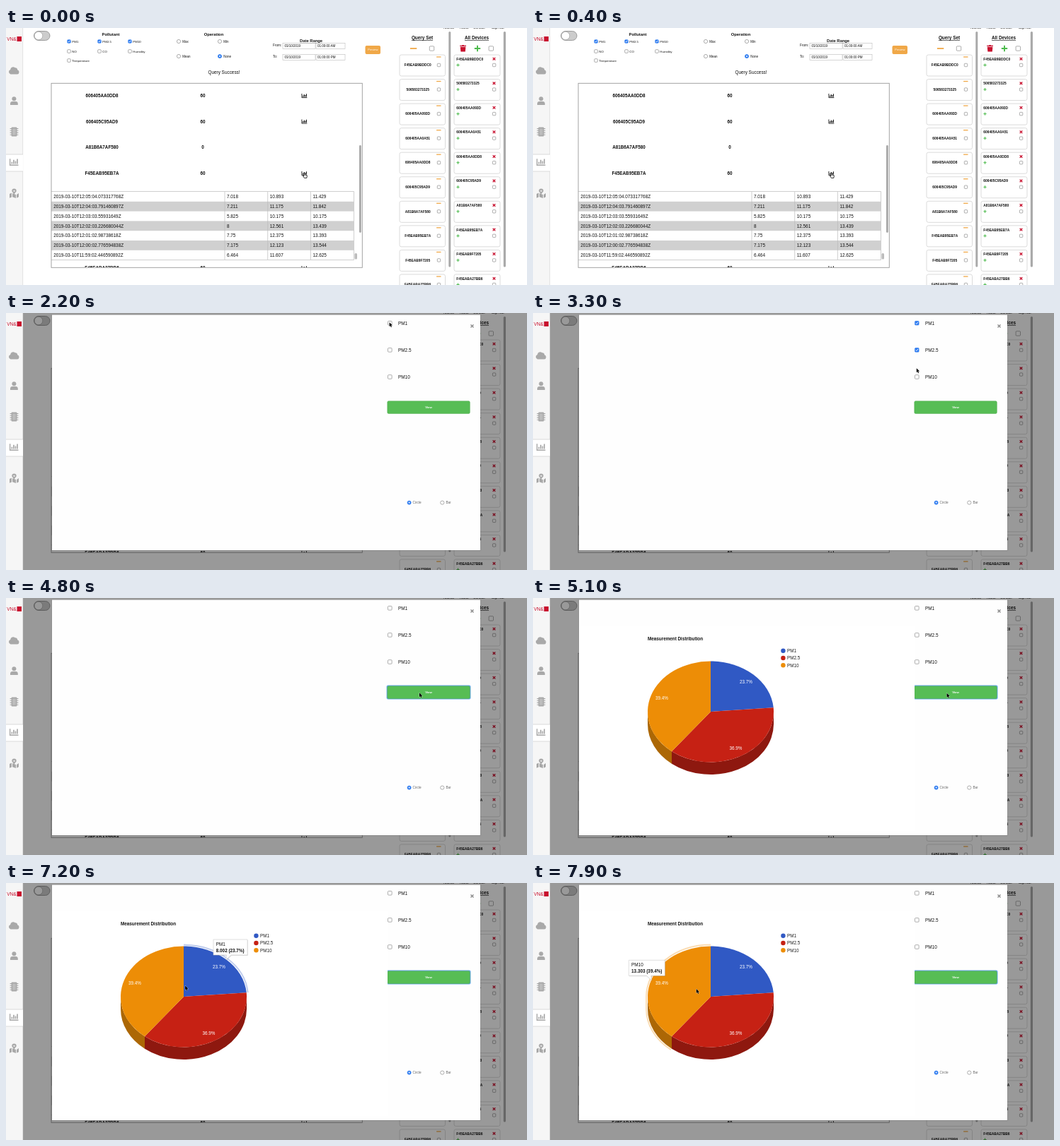
Animation, 736 px wide and 364 px high, one loop 8000 ms. Source, as an HTML page:

```html
<!DOCTYPE html>
<html lang="en">
<head>
<meta charset="utf-8">
<title>Sensor query</title>
<style>
  html, body { margin: 0; width: 100%; height: 100%; overflow: hidden; background: #fff; }
  svg { display: block; width: 736px; height: 364px; }
  text { font-family: "Liberation Sans", Arial, sans-serif; white-space: pre; }
</style>
</head>
<body>
<svg id="stage" viewBox="0 0 736 364" xmlns="http://www.w3.org/2000/svg"></svg>
<script>
const stage = document.getElementById('stage');
const BLUE = '#2f7cf0', ORANGE = '#f0a848', GREEN = '#4cba4c', RED = '#c8102e';

// y is the vertical middle of the text
function text(x, y, s, size, o = {}) {
  return `<text x="${x}" y="${y + size * 0.36}" font-size="${size}" fill="${o.fill || '#111'}"` +
    ` font-weight="${o.bold ? 700 : 400}" text-anchor="${o.mid ? 'middle' : 'start'}"` +
    `${o.line ? ' text-decoration="underline"' : ''}>${s}</text>`;
}
function rect(x, y, w, h, fill, more = '') {
  return `<rect x="${x}" y="${y}" width="${w}" height="${h}" fill="${fill}" ${more}/>`;
}
function path(d, fill, more = '') {
  return `<path d="${d}" fill="${fill}" ${more}/>`;
}
function line(d, color, width) {
  return path(d, 'none', `stroke="${color}" stroke-width="${width}"`);
}
function at(x, y, body) {
  return `<g transform="translate(${x} ${y})">${body}</g>`;
}
function check(x, y, on, s = 5) {
  const r = s / 2, k = s / 6;
  const box = rect(-r, -r, s, s, on ? BLUE : '#fff', `rx="1" stroke="${on ? BLUE : '#777'}" stroke-width=".6"`);
  const tick = on ? line(`M${-1.7 * k} 0L${-0.5 * k} ${1.4 * k}L${1.8 * k} ${-1.6 * k}`, '#fff', 0.9) : '';
  return at(x, y, box + tick);
}
function radio(x, y, on) {
  return `<circle cx="${x}" cy="${y}" r="2.6" fill="${on ? BLUE : '#fff'}" stroke="${on ? BLUE : '#777'}" stroke-width=".6"/>` +
    (on ? `<circle cx="${x}" cy="${y}" r="1" fill="#fff"/>` : '');
}
const minus = (x, y, r, w) => line(`M${x - r} ${y}H${x + r}`, ORANGE, w);
const plus = (x, y, r, w) => line(`M${x - r} ${y}H${x + r}M${x} ${y - r}V${y + r}`, GREEN, w);
const cross = (x, y, r, c, w) => line(`M${x - r} ${y - r}L${x + r} ${y + r}M${x + r} ${y - r}L${x - r} ${y + r}`, c, w);
function bars(x, y, k, c) {
  return `<g transform="translate(${x} ${y}) scale(${k})">` +
    line('M-3.6-3V2.6H3.8', c, 0.9) + line('M-1.9 1.6V-.2M-.3 1.6V-2M1.3 1.6V-1M2.9 1.6V-2.8', c, 1.05) + '</g>';
}

const ids = ['F45EAB9BDDC0', '506583273325', '606405AA093D', '606405AA0A51', '606405AA0DD8',
  '606405C95AD9', 'A81B6A7AF580', 'F45EAB95EB7A', 'F45EAB9F7205', 'F45EABA27BB6'];
const readings = [
  ['12:05:04.073317768', '7.018', '10.893', '11.429'],
  ['12:04:03.791460897', '7.211', '11.175', '11.842'],
  ['12:03:03.55931649', '5.825', '10.175', '10.175'],
  ['12:02:03.226680044', '8', '12.561', '13.439'],
  ['12:01:02.98738618', '7.75', '12.375', '13.393'],
  ['12:00:02.776594838', '7.175', '12.123', '13.544'],
  ['11:59:02.446590892', '6.464', '11.607', '12.625']
];

function queryForm() {
  let s = rect(39.5, 4.5, 22.5, 13, '#ccc', 'rx="6.5" stroke="#888" stroke-width=".8"') +
    '<circle cx="46" cy="11" r="5.8" fill="#fff" stroke="#888" stroke-width=".5"/>';
  s += text(148, 9, 'Pollutant', 5.8, { bold: 1, mid: 1 }) +
    text(293.5, 9, 'Operation', 5.8, { bold: 1, mid: 1 }) +
    text(431, 18, 'Date Range', 5.8, { bold: 1, mid: 1, line: 1 });
  [['PM1', 89, 19, 1], ['PM2.5', 132, 19, 1], ['PM10', 175, 19, 1], ['NO', 89, 33], ['CO', 132, 33],
    ['Humidity', 175, 33], ['Temperature', 89, 46]].forEach(([name, x, y, on]) => {
    s += check(x, y, on, 4.6) + text(x + 4.3, y, name, 4.4);
  });
  [['Max', 244, 19], ['Min', 302, 19], ['Mean', 244, 40], ['None', 302, 40, 1]].forEach(([name, x, y, on]) => {
    s += radio(x, y, on) + text(x + 5.2, y, name, 4.5);
  });
  [['From:', 25.5, 'AM'], ['To:', 41.5, 'PM']].forEach(([name, y, half]) => {
    s += text(377, y - 1, name, 4.7) +
      rect(391, y - 4, 46, 8, '#fff', 'stroke="#bbb" stroke-width=".6"') +
      rect(438, y - 4, 41, 8, '#fff', 'stroke="#bbb" stroke-width=".6"') +
      text(393.5, y, '03/10/2019', 4.5) + text(440, y, `01:00:00 ${half}`, 4.5);
  });
  s += rect(507.5, 25, 21.5, 12, ORANGE, 'rx="2"') + text(518.3, 31, 'Preview', 4, { mid: 1, fill: '#fff' });
  return s + text(308, 63, 'Query Success!', 6.4, { mid: 1 });
}

function results() {
  let s = '<clipPath id="box"><rect x="64" y="78" width="439" height="261"/></clipPath><g clip-path="url(#box)">';
  [[ids[4], 60, 96], [ids[5], 60, 132.5], [ids[6], 0, 169], [ids[7], 60, 206], [ids[9], 60, 340]].forEach(([id, n, y]) => {
    s += text(135.5, y, id, 6.3, { bold: 1, mid: 1 }) + text(278, y, n, 6.3, { bold: 1, mid: 1 });
    if (n) s += bars(421.5, y, 1, '#111');
  });
  const rowH = 13.8;
  readings.forEach(([time, ...values], i) => {
    const y = 232 + i * rowH;
    if (i % 2) s += rect(64, y, 427, rowH, '#d0d0d0');
    s += text(67.2, y + rowH / 2, `2019-03-10T${time}Z`, 6.38);
    values.forEach((v, k) => s += text(312 + k * 60.7, y + rowH / 2, v, 6.38));
  });
  s += line('M64 231.5H491.5V328.5H64M309 232V328M369.7 232V328M430.4 232V328', '#bbb', 0.7);
  s += rect(492.5, 319, 3.5, 8.5, '#bbb', 'rx="1.5"') + rect(499, 166, 2.8, 124, '#a8a8a8', 'rx="1.4"') + '</g>';
  return s + rect(64, 78.3, 439.3, 261, 'none', 'stroke="#999" stroke-width=".9"');
}

function devices() {
  let s = '';
  [['Tutorial', 617], ['About', 641], ['Contact', 660], ['Sign out', 686]].forEach(([name, x]) => s += text(x, -0.8, name, 4.8));
  s += text(588, 14, 'Query Set', 6.4, { bold: 1, mid: 1, line: 1 }) +
    text(665, 14, 'All Devices', 6.4, { bold: 1, mid: 1, line: 1 }) +
    minus(575.6, 29, 4.7, 1.8) + check(601.5, 29, 0, 6.4) + check(685.3, 29, 0, 6.4) + plus(666, 29, 4.2, 1.9) +
    path('M641.8 26.7H649.4L648.8 33.5H642.4ZM641.2 24.8H644L644.6 24H646.6L647.2 24.8H650V25.9H641.2Z', RED);
  ids.forEach((id, i) => {
    const y = 52.5 + i * 34.55, card = 'rx="2.5" stroke="#d2d2d2" stroke-width=".8"';
    s += rect(556, y - 14.5, 64.5, 30, '#fff', card) + rect(633, y - 14.5, 65, 30, '#fff', card) +
      text(581.7, y, id, 4.85, { bold: 1, mid: 1 }) + minus(611.3, y - 11.5, 3.2, 1.3) + check(611.5, y, 0, 4.4) +
      text(636.3, y - 8.5, id, 4.85, { bold: 1 }) + cross(689.5, y - 8.8, 1.8, RED, 1.3) +
      plus(638.5, y, 2.1, 1) + check(689.6, y, 0, 4.4);
  });
  return s + rect(625.3, 5, 3, 333.5, '#aaa', 'rx="1.5"') + rect(702.8, 5, 3.2, 333.5, '#aaa', 'rx="1.5"');
}

function sidebar() {
  const c = '#a9a9a9';
  let s = rect(0, 0, 24, 364, '#f6f6f6') + line('M23.7 0V364', '#d4d4d4', 0.6) +
    rect(0, 179, 24, 24, '#fff') + line('M0 179H24M0 203H24', '#ccc', 0.7) +
    text(1.2, 15.8, 'VN&amp;', 6.6, { fill: RED }) + rect(15.5, 12, 6.5, 7, RED);
  s += path('M6.5 65.5A3.4 3.4 0 0 1 6.2 59A4 4 0 0 1 12.8 56.2A3 3 0 0 1 16.2 59.3A3.2 3.2 0 0 1 16 65.5Z', c) +
    `<circle cx="11.4" cy="100.3" r="3" fill="${c}"/>` + path('M6 109V107A3.2 3.2 0 0 1 9 104H13.8A3.2 3.2 0 0 1 16.8 107V109Z', c) +
    rect(7.6, 140.5, 7.8, 13, c, 'rx="1"') +
    line('M5.6 142.6H17.4M5.6 145.5H17.4M5.6 148.4H17.4M5.6 151.3H17.4', c, 1.1) +
    rect(9.2, 142.5, 4.6, 9, '#bdbdbd') + bars(11.4, 190, 1.6, c) +
    path('M5 235L8 233.5V239.5L5 240.8ZM9 234L14 236V241L9 239.3ZM15 236L18 234V239.2L15 240.8Z', c) +
    path('M11.5 235.5C9.7 233 8.3 232 8.3 230.8A3.2 3.2 0 0 1 14.7 230.8C14.7 232 13.3 233 11.5 235.5Z', c) +
    '<circle cx="11.5" cy="230.8" r="1.1" fill="#f6f6f6"/>';
  return s;
}

// Pie geometry: share of the turn, clockwise from the top
const pie = { x: 251, y: 161, rx: 89, ry: 71.5, depth: 17.5 };
const slices = [
  { name: 'PM1', from: 0, to: 0.237, fill: '#3059c4', value: '8.002', pct: '23.7%', lx: 301, ly: 118.5 },
  { name: 'PM2.5', from: 0.237, to: 0.606, fill: '#c62114', side: '#8e180f', value: '12.458', pct: '36.9%', lx: 286.5, ly: 212.5 },
  { name: 'PM10', from: 0.606, to: 1, fill: '#ed8d06', side: '#ac6705', value: '13.303', pct: '39.4%', lx: 182, ly: 142 }
];
function rim(share, grow = 0, dy = 0) {
  const a = share * 2 * Math.PI;
  return [pie.x + (pie.rx + grow) * Math.sin(a), pie.y + dy - (pie.ry + grow) * Math.cos(a)].map(v => v.toFixed(2)).join(' ');
}
const arc = (to, sweep, grow = 0) => `A${pie.rx + grow} ${pie.ry + grow} 0 0 ${sweep} ${to}`;

function sideWall({ from, to, side }) {
  const a = Math.max(from, 0.25), b = Math.min(to, 0.75);
  return path(`M${rim(a)}${arc(rim(b), 1)}L${rim(b, 0, pie.depth)}${arc(rim(a, 0, pie.depth), 0)}Z`, side);
}
function chart() {
  let s = rect(65.5, 40, 473.5, 290, '#fff') + text(162, 58, 'Measurement Distribution', 6.33, { bold: 1 });
  s += sideWall(slices[1]) + sideWall(slices[2]);
  slices.forEach((p, i) => {
    s += path(`M${pie.x} ${pie.y}L${rim(p.from)}${arc(rim(p.to), 1)}Z`, p.fill) +
      text(p.lx, p.ly, p.pct, 6.3, { mid: 1, fill: '#fff' });
    const y = 74.7 + i * 10.3;
    s += `<circle cx="353.4" cy="${y}" r="3.2" fill="${p.fill}"/>` + text(359, y, p.name, 6.3, { fill: '#222' });
  });
  return s;
}
function hover(i) {
  const p = slices[i], g = 1.9, left = i === 2;
  const d = left
    ? `M${rim(1, g)}${arc(rim(0.75, g), 0, g)}v${pie.depth}${arc(rim(p.from, g, pie.depth), 0, g)}`
    : `M${rim(p.from, g)}${arc(rim(p.to, g), 1, g)}`;
  const w = left ? 51 : 48, x = left ? 135.3 : 293, y = left ? 109.3 : 80;
  const tip = left ? 'H31.5L32.2 28.5L25 22H' : 'H25L18 28.5L18.5 22H';
  return path(d, 'none', `stroke="${p.fill}" stroke-width="2" stroke-opacity=".3"`) +
    at(x, y, path(`M0 0H${w}V22${tip}0Z`, '#000', 'opacity=".12" transform="translate(.8 .9)"') +
      path(`M0 0H${w}V22${tip}0Z`, '#fff', 'stroke="#ccc" stroke-width=".6"') +
      text(3.8, 6.7, p.name, 6.35) + text(3.8, 15.6, `${p.value} (${p.pct})`, 6.35, { bold: 1 }));
}

function modal() {
  let s = rect(24, 0, 712, 364, '#000', 'opacity=".4"') +
    rect(64.5, 2, 606, 335, '#000', 'opacity=".12"') + rect(65, 2.6, 605, 333.4, '#fefefe') +
    cross(658.5, 18.5, 2, '#888', 1.3) + '<g id="boxes"></g>';
  ['PM1', 'PM2.5', 'PM10'].forEach((name, i) => s += text(554, 14.3 + 38.1 * i, name, 6.4));
  s += '<rect id="ring" x="537.6" y="123.6" width="118.9" height="20" rx="2" fill="#6aa9ee"/>' +
    rect(538.8, 124.8, 116.5, 17.6, '#57bd55', 'rx="1.6" stroke="#4aa84a" stroke-width=".5"') +
    text(597, 133.6, 'View', 4.3, { mid: 1, fill: '#fff', bold: 1 }) +
    radio(569.6, 268.6, 1) + text(574.6, 268.6, 'Circle', 4.7, { fill: '#666' }) +
    radio(616.3, 268.6) + text(621.4, 268.6, 'Bar', 4.7, { fill: '#666' });
  return s + `<g id="chart">${chart()}<g id="hover0">${hover(0)}</g><g id="hover2">${hover(2)}</g></g>`;
}

const arrow = path('M0 0V6L1.4 4.8L2.3 7L3.3 6.5L2.4 4.4H4.3Z', '#000', 'stroke="#fff" stroke-width=".5" paint-order="stroke"');
const hand = path('M-.6 0Q.2-.6.8 0V2.6L3.2 3.2Q3.8 3.4 3.7 4.2L3.2 7H-.2L-2.1 4.3Q-1.5 3.5-.6 4.3Z', '#fff', 'stroke="#000" stroke-width=".8"');

stage.innerHTML = rect(0, 0, 736, 364, '#fff') + queryForm() + results() + devices() +
  `<g id="modal">${modal()}</g>` + sidebar() + `<g id="hand">${hand}</g><g id="arrow">${arrow}</g>`;

const node = {};
stage.querySelectorAll('[id]').forEach(n => node[n.id] = n);
const show = (id, on) => node[id].style.display = on ? '' : 'none';

// time, x, y of the pointer tip
const track = [[0, 421.6, 205.4], [1200, 421.6, 205.4], [1500, 462, 130], [1800, 556, 2], [2100, 542, 12.5], [2200, 541.6, 13.2],
  [2500, 541.6, 13.2], [2900, 541.6, 50], [3100, 541.6, 51], [3300, 541.8, 78.2], [3400, 541.8, 88], [3600, 541.8, 89],
  [3900, 604, 122], [4300, 584, 134.3], [5000, 584, 134.3], [5500, 587, 136], [5900, 587, 136], [6200, 448.6, 151.2],
  [6500, 290, 143], [6700, 266, 143], [7000, 266, 143], [7500, 234, 149], [7900, 230.8, 150]];
function pointer(t) {
  const i = track.findIndex(k => k[0] > t);
  if (i < 0) return track[track.length - 1].slice(1);
  const [t0, x0, y0] = track[i - 1], [t1, x1, y1] = track[i], p = (t - t0) / (t1 - t0);
  return [x0 + (x1 - x0) * p, y0 + (y1 - y0) * p];
}

function draw(ms) {
  const t = Math.floor(ms / 100) * 100;
  const [x, y] = pointer(t);
  show('modal', t >= 600);
  show('hand', t < 600);
  show('arrow', t >= 600);
  node.hand.setAttribute('transform', `translate(${x} ${y})`);
  node.arrow.setAttribute('transform', `translate(${x} ${y})`);
  node.boxes.innerHTML = [2400, 3100, 3600].map((from, i) =>
    check(542.3, 14.3 + 38.1 * i, t >= from && t < 4500, 5.6)).join('');
  show('ring', t >= 4500);
  show('chart', t >= 5100);
  show('hover0', t >= 6500 && t < 7300);
  show('hover2', t >= 7300);
}

const start = performance.now();
function tick() {
  draw((performance.now() - start) % 8000);
  requestAnimationFrame(tick);
}
draw(0);
requestAnimationFrame(tick);
</script>
</body>
</html>
```
